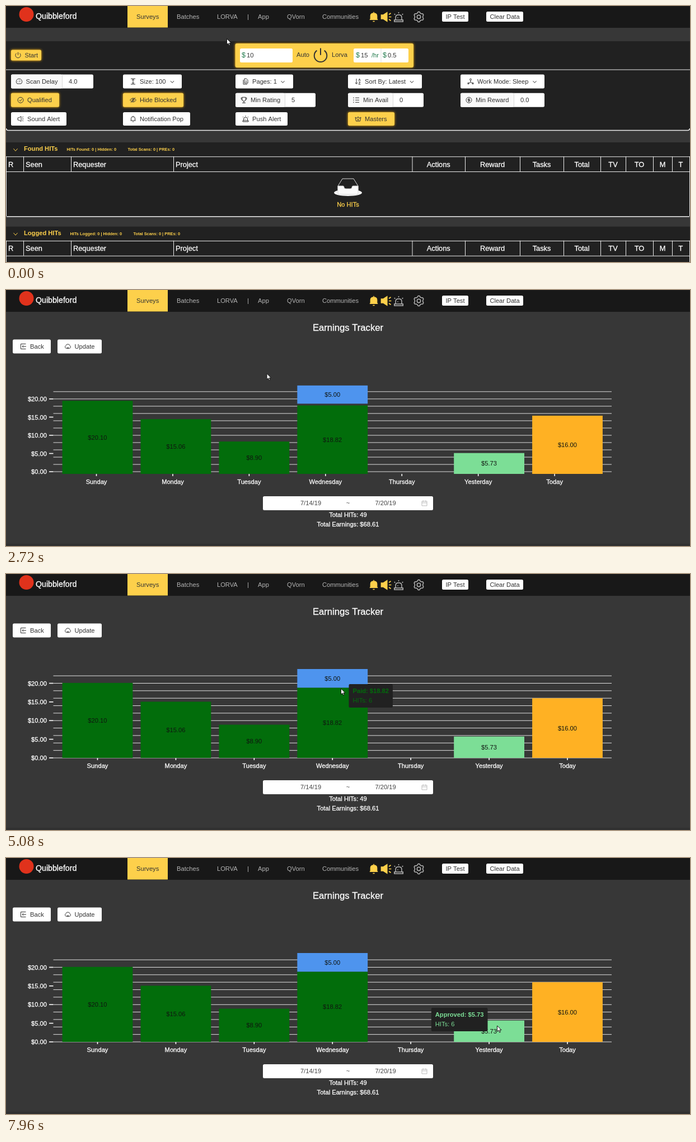
An HTML page with a canvas for the animation above (8 s loop, 1222 by 458 pixels).

```html
<!DOCTYPE html>
<html lang="en">
<head>
<meta charset="utf-8">
<title>Earnings tracker</title>
<style>
html, body { margin: 0; width: 100%; height: 100%; overflow: hidden; background: #373737; }
canvas { display: block; }
</style>
</head>
<body>
<canvas id="stage" width="1222" height="458"></canvas>
<script>
const ctx = document.getElementById('stage').getContext('2d');
const LOOP = 8000, PAGE_AT = 2200, DATA_AT = 2340;
const YELLOW = '#fdd04b', DARK = '#212121', BAR = '#181818', GREY = '#373737', LINE = '#ececec';
const INK = '#333', MUTED = '#b4b4b4', WHITE = '#fff', GREEN = '#026d0b', MINT = '#7cde96';
const BASE = 11.15;

const ICONS = {
  power: 'M-2.7-3.6A4.6 4.6 0 1 0 2.7-3.6M0-5.3V-.3',
  gauge: 'M-3.6 4A5.2 5.2 0 1 1 3.6 4ZM0 1L2.4-1.5M-3 0H-2M0-3V-2',
  height: 'M-4-5H4M-4 5H4M0-4V4M-2-2L0-4 2-2M-2 2L0 4 2 2',
  pages: 'M-4-3V5H3M-2-5H1.5L4-2.5V3H-2ZM0-1H2M0 1H2',
  sort: 'M-3-5V4M-5 2L-3 4.5-1 2M1-1L2.5-5 4-1M1 1H4L1 5H4.5',
  nodes: 'M0-2V1L-3 3M0 1L3 3M1.5-3.5A1.5 1.5 0 1 1-1.5-3.5 1.5 1.5 0 1 1 1.5-3.5M-5 2.5H-3V4.5H-5ZM3 2.5H5V4.5H3Z',
  check: 'M5 0A5 5 0 1 1-5 0 5 5 0 1 1 5 0M-2.4 0L-.5 2 2.5-2',
  hidden: 'M-5.5 0Q0-7 5.5 0Q0 7-5.5 0M1.7 0A1.7 1.7 0 1 1-1.7 0 1.7 1.7 0 1 1 1.7 0M-4 4.5L4-4.5',
  trophy: 'M-3-5H3V-1Q3 2 0 2T-3-1ZM-3-4H-5Q-5 0-3 0M3-4H5Q5 0 3 0M0 2V5M-3 5H3',
  list: 'M-2-4H5M-2 0H5M-2 4H5M-5-5V-3M-5-1V1M-5 3V5',
  dollar: 'M5 0A5 5 0 1 1-5 0 5 5 0 1 1 5 0M2-1.5Q0-3-1.7-1.5T0 0 1.7 1.5-2 1.5M0-3.3V3.3',
  sound: 'M-5-2H-3L1-4.5V4.5L-3 2H-5ZM3 0H5.5M3-2.5L5-4M3 2.5L5 4',
  bell: 'M-4.5 3H4.5M-3.5 3V-1Q-3.5-4 0-4T3.5-1V3M0-4V-5.5M-1 5H1',
  alarm: 'M-5 5H5V3H-5ZM-3.5 3V0Q-3.5-3 0-3T3.5 0V3M0-4.5V-6M-4-3L-5-4M4-3L5-4M-1 1V0',
  crown: 'M-5-3L-3.5 4H3.5L5-3 2-1 0-4-2-1ZM1 1.5A1 1 0 1 1-1 1.5 1 1 0 1 1 1 1.5',
  down: 'M-3-1.5L0 2 3-1.5',
  back: 'M4.5-4.5H-4.5V4.5H4.5M5 0H-2M0-2L-2 0 0 2',
  cloud: 'M-3 3.5A2.8 2.8 0 0 1-3.6-1.5 3.8 3.8 0 0 1 3.6-1.5 2.8 2.8 0 0 1 3 3.5ZM1.6 1A1.6 1.6 0 1 1-1.6 1',
  calendar: 'M-4.5-3.5H4.5V4.5H-4.5ZM-4.5-.7H4.5M-2.2-5V-2.5M2.2-5V-2.5'
};
const ARROW = new Path2D('M0 0V10.5L2.5 8.2 4.2 12 5.9 11.3 4.3 7.7H7.6Z');
const HAND = new Path2D('M0 1Q1-1 2 1V5L6 6Q7.5 6.5 7.3 8L6.5 12.5H1.2L-2.3 8Q-2.5 6 0 7.5Z');

function rect(x, y, w, h, color) {
  ctx.fillStyle = color;
  ctx.fillRect(x, y, w, h);
}

function box(x1, y1, x2, y2, color, r = 2.5, glow = 0) {
  ctx.save();
  if (glow) { ctx.shadowColor = '#f5ae10'; ctx.shadowBlur = glow; }
  ctx.fillStyle = color;
  ctx.beginPath();
  ctx.roundRect(x1, y1, x2 - x1, y2 - y1, r);
  ctx.fill();
  ctx.restore();
}

// y is the middle of the capital letters; bright text gets a slightly heavier stem
function text(str, x, y, color = INK, { size = BASE, align = 'left', bold = false } = {}) {
  const baseline = Math.round(y + size * 0.35);
  ctx.font = `${bold ? 'bold ' : ''}${size}px "Liberation Sans", Arial, sans-serif`;
  ctx.textAlign = align;
  ctx.fillStyle = ctx.strokeStyle = color;
  ctx.fillText(str, x, baseline);
  if (!bold && (color === WHITE || color === YELLOW)) {
    ctx.lineWidth = 0.3;
    ctx.strokeText(str, x, baseline);
  }
}

const centered = (str, x, y, color, size = BASE) => text(str, x, y, color, { size, align: 'center' });

function icon(name, x, y, color = INK, { scale = 1, width = 1, fill = false } = {}) {
  const path = new Path2D(ICONS[name]);
  ctx.save();
  ctx.translate(x, y);
  ctx.scale(scale, scale);
  ctx.lineWidth = width / scale;
  ctx.strokeStyle = ctx.fillStyle = color;
  if (fill) ctx.fill(path);
  ctx.stroke(path);
  ctx.restore();
}

function gear(x, y) {
  ctx.strokeStyle = MUTED;
  ctx.lineWidth = 1.5;
  ctx.beginPath();
  for (let i = 0; i < 24; i++) {
    const a = (i - 0.5) * Math.PI / 12 + Math.PI / 6, r = i % 4 < 2 ? 9 : 7.2;
    ctx.lineTo(x + r * Math.cos(a), y + r * Math.sin(a));
  }
  ctx.closePath();
  ctx.moveTo(x + 3.2, y);
  ctx.arc(x, y, 3.2, 0, 7);
  ctx.stroke();
}

function header(appActive) {
  rect(0, 0, 1222, 39, BAR);
  ctx.fillStyle = '#e0321c';
  ctx.beginPath();
  ctx.arc(36.5, 15, 13, 0, 7);
  ctx.fill();
  text('Quibbleford', 53, 18.5, WHITE, { size: 14.2 });
  rect(217, 0, 72, 38.5, YELLOW);
  text('Surveys', 233, 19);
  text('Batches', 305, 19, MUTED);
  text('LORVA', 377, 19, MUTED);
  text('|', 431, 19, MUTED);
  text('App', 450, 19, appActive ? YELLOW : MUTED);
  text('QVorn', 502, 19, MUTED);
  text('Communities', 565, 19, MUTED);
  icon('bell', 657, 19.5, YELLOW, { scale: 1.6, width: 1.5, fill: true });
  icon('sound', 679, 19.5, YELLOW, { scale: 1.7, width: 1.7, fill: true });
  icon('alarm', 701.5, 20.3, MUTED, { scale: 1.55, width: 1.5 });
  gear(737.5, 19.5);
  box(779, 10, 826, 28, WHITE);
  centered('IP Test', 802.5, 19, INK);
  box(858, 10, 924, 28, WHITE);
  centered('Clear Data', 891, 19, INK);
}

function button(x1, x2, y, iconName, label, textX, { on = false, arrow = 0, split = 0, value = '', h = 25 } = {}) {
  const top = y - h / 2;
  box(x1, top, x2, top + h, on ? YELLOW : WHITE, 2.5, on ? 4 : 0);
  if (split) {
    box(x1, top, split, top + h, '#f9f9f9');
    rect(split, top, 1, h, '#d9d9d9');
    text(value, split + 12, y);
  }
  icon(iconName, textX - 12, y);
  text(label, textX, y);
  if (arrow) icon('down', arrow, y + 0.5);
}

function controls() {
  rect(0, 63, 1222, 160, DARK);
  rect(0, 113.5, 1222, 1, LINE);
  ctx.strokeStyle = LINE;
  ctx.lineWidth = 1.6;
  ctx.beginPath();
  ctx.moveTo(0.5, 219);
  ctx.quadraticCurveTo(0.5, 222.5, 4, 222.5);
  ctx.lineTo(1218, 222.5);
  ctx.quadraticCurveTo(1221.5, 222.5, 1221.5, 219);
  ctx.stroke();

  button(9, 63, 88, 'power', 'Start', 33.5, { on: true, h: 19 });
  box(409.5, 67, 728, 110, YELLOW, 3, 4);
  box(418, 76, 512, 101, WHITE);
  text('$', 421, 88, '#217a4b', { size: 12.5 });
  text('10', 430, 88);
  text('Auto', 519, 87.5);
  icon('power', 562, 88.5, INK, { scale: 2.45, width: 2 });
  text('Lorva', 582, 87.5);
  box(621, 76, 719, 101, WHITE);
  rect(669.5, 76, 1, 25, '#ddd');
  text('$', 625, 88, '#217a4b', { size: 12.5 });
  text('15', 634, 88);
  text('/hr', 653, 88, '#217a4b');
  text('$', 673, 88, '#217a4b', { size: 12.5 });
  text('0.5', 682, 88);

  button(9, 156, 135, 'gauge', 'Scan Delay', 35.5, { split: 100, value: '4.0' });
  button(209, 314, 135, 'height', 'Size: 100', 239, { arrow: 297 });
  button(410, 513, 135, 'pages', 'Pages: 1', 440, { arrow: 494.5 });
  button(611, 743, 135, 'sort', 'Sort By: Latest', 641, { arrow: 725 });
  button(812, 962, 135, 'nodes', 'Work Mode: Sleep', 842, { arrow: 944.5 });
  button(9, 95, 168.3, 'check', 'Qualified', 38, { on: true });
  button(209, 317, 168.3, 'hidden', 'Hide Blocked', 239, { on: true });
  button(410, 553, 168.3, 'trophy', 'Min Rating', 437, { split: 498, value: '5' });
  button(611, 746, 168.3, 'list', 'Min Avail', 638, { split: 691, value: '0' });
  button(812, 962, 168.3, 'dollar', 'Min Reward', 839, { split: 907, value: '0.0' });
  button(9, 108, 202, 'sound', 'Sound Alert', 38, { h: 24 });
  button(209, 329, 202, 'bell', 'Notification Pop', 239, { h: 24 });
  button(410, 503, 202, 'alarm', 'Push Alert', 440, { h: 24 });
  button(611, 694, 202, 'crown', 'Masters', 641, { on: true, h: 24 });
}

const COLUMNS = [['R', 0], ['Seen', 31], ['Requester', 116], ['Project', 299], ['Actions', 725.5], ['Reward', 820],
  ['Tasks', 918], ['Total', 996], ['TV', 1062], ['TO', 1107], ['M', 1156], ['T', 1190], ['', 1221]];

function table(y, title, stats, statsX, totalX) {
  rect(0, y, 1222, 133, DARK);
  icon('down', 17, y + 13, YELLOW, { scale: 1.2 });
  text(title, 32, y + 11.5, YELLOW, { bold: true });
  text(stats, statsX, y + 12.8, YELLOW, { size: 7.4, bold: true });
  text('Total Scans: 0 | PREs: 0', totalX, y + 12.8, YELLOW, { size: 7.4, bold: true });
  rect(0, y + 25.2, 1222, 1, LINE);
  rect(0, y + 52, 1222, 1, LINE);
  COLUMNS.forEach(([label, x], i) => {
    rect(x, y + 25, 1, 27, LINE);
    if (!label) return;
    if (i < 4) text(label, x + 4, y + 39.2, WHITE, { size: 12.8 });
    else centered(label, (x + COLUMNS[i + 1][1]) / 2, y + 39.2, WHITE, 12.8);
  });
  rect(0, y + 52, 1, 80, LINE);
  rect(1221, y + 52, 1, 80, LINE);
  rect(1, y + 132, 1220, 1.5, LINE);
}

function emptyTray() {
  ctx.fillStyle = '#f5f5f5';
  ctx.beginPath();
  ctx.ellipse(611, 334, 25, 6, 0, 0, 7);
  ctx.fill();
  ctx.strokeStyle = '#d9d9d9';
  ctx.lineWidth = 1;
  ctx.fillStyle = DARK;
  const back = new Path2D('M593 322L601 309H621L629 322V330H593Z');
  ctx.fill(back);
  ctx.stroke(back);
  ctx.fillStyle = '#fafafa';
  const front = new Path2D('M593 322H602Q604 322 604 324.5T607 327H615Q618 327 618 324.5T620 322H629V335Q629 337 627 337H595Q593 337 593 335Z');
  ctx.fill(front);
  ctx.stroke(front);
  centered('No HITs', 611, 355, YELLOW);
}

function surveysPage() {
  controls();
  table(244, 'Found HITs', 'HITs Found: 0 | Hidden: 0', 108.5, 217.5);
  emptyTray();
  table(394.7, 'Logged HITs', 'HITs Logged: 0 | Hidden: 0', 114.5, 227.5);
}

const LEFT = 84.5, TOP = 170, FLOOR = 329, UNIT = (FLOOR - TOP) / 23.82, STEP = 139.92;
const DAYS = ['Sunday', 'Monday', 'Tuesday', 'Wednesday', 'Thursday', 'Yesterday', 'Today'];
// day index, start value, amount, colour
const BARS = [[0, 0, 20.1, GREEN], [1, 0, 15.06, GREEN], [2, 0, 8.9, GREEN], [3, 0, 18.82, GREEN],
  [3, 18.82, 5, '#4e94ee'], [5, 0, 5.73, MINT], [6, 0, 16, '#ffb123']];

function spring(s) {
  const decay = 7.5, freq = Math.sqrt(90 - decay * decay);
  return 1 - Math.exp(-decay * s) * (Math.cos(freq * s) + decay / freq * Math.sin(freq * s));
}

function chart(p) {
  const yOf = v => TOP + (FLOOR - v * UNIT - TOP) * p;
  ctx.globalAlpha = Math.min(1, Math.max(0, p));
  for (let v = 0; v <= 22; v += 2) rect(LEFT, yOf(v) - 0.5, 997.5, 1, '#e2e2e2');
  for (let v = 0; v <= 20; v += 5) {
    rect(77, yOf(v) - 0.8, 7.5, 1.6, WHITE);
    text(`$${v}.00`, 73, yOf(v) + 0.2, WHITE, { align: 'right' });
  }
  DAYS.forEach((day, i) => {
    const x = LEFT + (79 + i * STEP) * p;
    rect(x - 0.8, FLOOR, 1.6, 4, WHITE);
    centered(day, x, 343.3, WHITE);
  });
  ctx.globalAlpha = 1;
  for (const [day, from, amount, color] of BARS) {
    const h = amount * UNIT * p, bottom = FLOOR - from * UNIT, x = 100.6 + day * STEP;
    rect(x, bottom - h, 125.8, h, color);
    centered(`$${amount.toFixed(2)}`, x + 62.8, bottom - h / 2 + 0.2, '#101510');
  }
}

function earningsPage(t) {
  const loaded = t >= DATA_AT;
  rect(0, 454, 1222, 4, '#303030');
  centered('Earnings Tracker', 611, 67.3, WHITE, 16.65);
  button(12, 80, 101, 'back', 'Back', 43);
  button(92, 171, 101, 'cloud', 'Update', 122.5);
  if (loaded) chart(spring((t - DATA_AT) / 1000));
  box(459, 369, 763, 394, WHITE);
  centered(loaded ? '7/14/19' : 'Invalid date', 544.5, 381, '#444');
  centered('~', 611, 381, '#555');
  centered(loaded ? '7/20/19' : 'Invalid date', 678, 381, '#444');
  icon('calendar', 747.5, 381.5, '#bbb');
  centered(`Total HITs: ${loaded ? 49 : 0}`, 611, 402.5, WHITE);
  centered(`Total Earnings: $${loaded ? '68.61' : '0.00'}`, 611, 419, WHITE);
}

const ramp = (t, from, to) => Math.min(1, Math.max(0, (t - from) / (to - from)));

function menu(t, pointer) {
  const alpha = ramp(t, 800, 950) * (1 - ramp(t, 2360, 2540));
  if (!alpha) return;
  ctx.globalAlpha = alpha;
  box(434, 44, 561, 171, BAR, 3);
  ['Hot List', 'Block List', 'Earnings'].forEach((label, i) => {
    const y = 76 + i * 38.3;
    text(label, 457, y, Math.abs(pointer.y + 2 - y) < 19 ? YELLOW : MUTED);
  });
  ctx.globalAlpha = 1;
}

function tooltip(title, color, x, y, toLeft) {
  ctx.font = `bold ${BASE}px "Liberation Sans", Arial, sans-serif`;
  const w = ctx.measureText(title).width + 14;
  const left = toLeft ? x - 17 - w : x + 14, top = toLeft ? y - 32 : y - 8;
  box(left, top, left + w, top + 42, DARK, 2);
  text(title, left + 7, top + 12.5, color, { bold: true });
  text('HITs: 6', left + 7, top + 29, color);
}

const PATH = [[0, 394.5, 58.5], [760, 458, 18], [1000, 460, 22], [1700, 466, 149.5], [2800, 466, 149.5],
  [3200, 482, 153], [4200, 490, 162], [4560, 508, 214], [5080, 598.5, 205], [5500, 650, 228],
  [6920, 837, 273], [7300, 855, 287], [7960, 877.5, 300], [LOOP, 877.5, 300]];

function pointerAt(t) {
  const i = PATH.findIndex(k => k[0] > t);
  const [t0, x0, y0] = PATH[i - 1], [t1, x1, y1] = PATH[i];
  const k = ramp(t, t0, t1), e = k * k * (3 - 2 * k);
  return { x: x0 + (x1 - x0) * e, y: y0 + (y1 - y0) * e };
}

function drawPointer({ x, y }, shape) {
  ctx.save();
  ctx.translate(x, y);
  ctx.lineWidth = 1;
  ctx.strokeStyle = '#111';
  ctx.fillStyle = WHITE;
  ctx.fill(shape);
  ctx.stroke(shape);
  ctx.restore();
}

function draw(t) {
  const pointer = pointerAt(t), { x, y } = pointer;
  rect(0, 0, 1222, 458, GREY);
  if (t < PAGE_AT) surveysPage(); else earningsPage(t);
  header(t > 700 && t < 2420);
  menu(t, pointer);
  if (t > 4200) {
    if (x > 520.5 && x < 646 && y > 203.5) tooltip('Paid: $18.82', GREEN, x, y, false);
    if (x > 800.3 && x < 926 && y > 291) tooltip('Approved: $5.73', MINT, x, y, true);
  }
  drawPointer(pointer, t > 700 && t < 2480 ? HAND : ARROW);
}

const start = performance.now();
function tick() {
  draw((performance.now() - start) % LOOP);
  requestAnimationFrame(tick);
}
tick();
</script>
</body>
</html>
```
